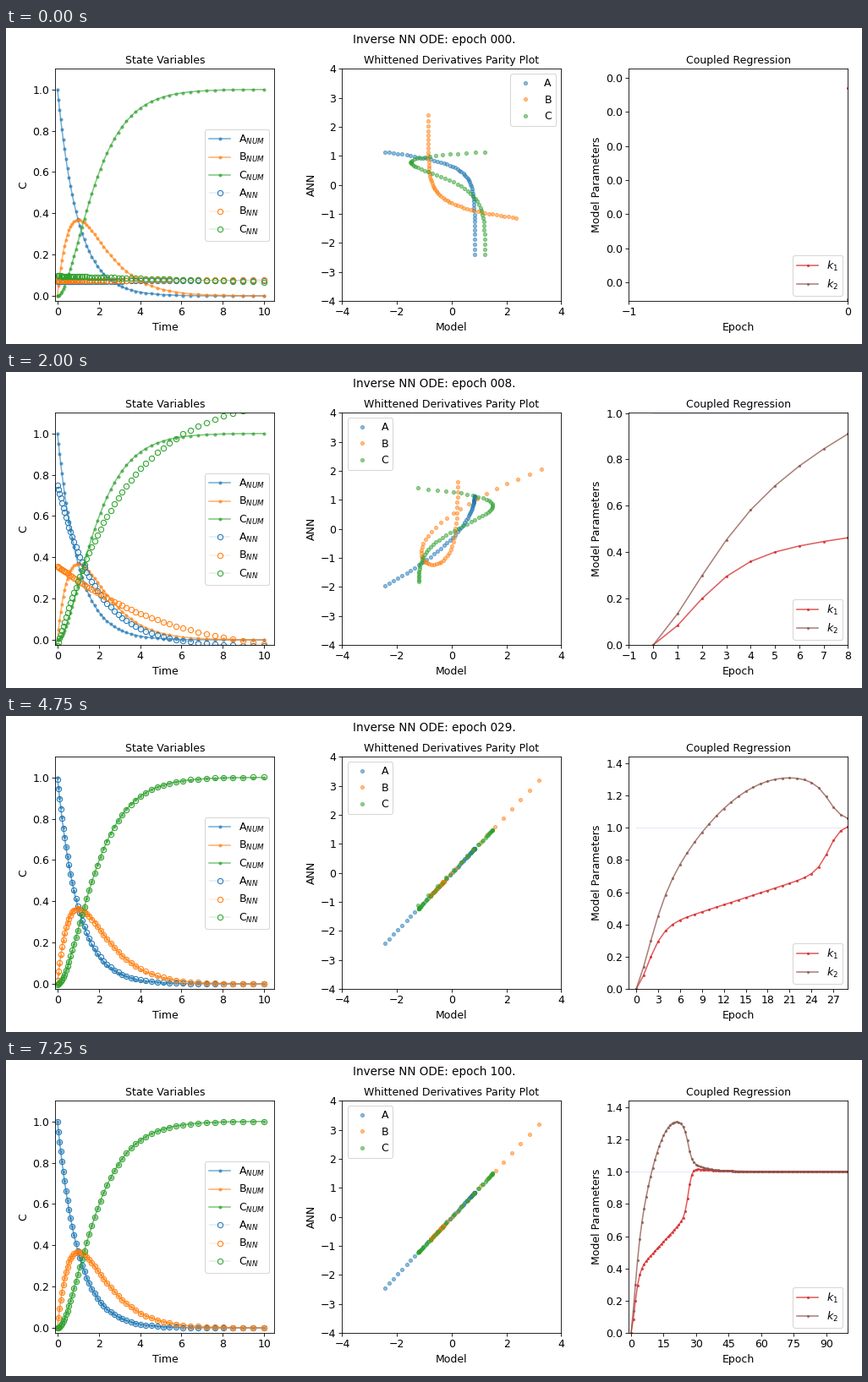
Recreate the animation shown at these times as a matplotlib script. Size 1012x374 px, loop 7500 ms.

```python
import numpy as np
import matplotlib.pyplot as plt
from matplotlib.animation import FuncAnimation
from matplotlib.ticker import FormatStrFormatter, MaxNLocator

W, H, DPI = 1012, 374, 75
FRAMES, INTERVAL = 30, 250
COLORS = ("C0", "C1", "C2")

plt.rcParams.update({"font.family": "DejaVu Sans", "font.size": 12,
                     "axes.titlesize": 12, "legend.fontsize": 12})


def fade(x, scale, power=1):
    """Stretched exponential from 1 down to 0."""
    return np.exp(-(x / scale) ** power)


def decay(start, end, scale, power=1):
    return end + (start - end) * fade(t, scale, power)


# Reaction A -> B -> C with unit rates, sampled evenly in log time
t = np.geomspace(1, 11, 50) - 1
A, B = np.exp(-t), t * np.exp(-t)
TRUE = np.array([A, B, 1 - A - B])
START = np.array([.07 + .0006 * t, .075 + .0003 * t, .097 - .003 * t])

# Rate constants: early growth, then both lock on to 1 near epoch 27
E = np.arange(101)
LOCK = 1 / (1 + np.exp(-1.18 * (E - 26.54)))
grow1 = 5.7e-4 + .345 * (1 - fade(E, 2.55, 1.6)) + .0147 * E
grow2 = 1.308 - .00235 * (21 - E) ** 2 - .2717 * fade(E, 2.9, 1.75)
K1 = grow1 + LOCK * (1 + .02 * fade(E - 28, 10) - grow1)
K2 = grow2 + LOCK * (1 + .06 * fade(E - 28, 6) - grow2)


def epoch_at(i):
    """Every epoch at first, then evenly in log scale up to 100."""
    return i if i <= 12 else round(100 * 10 ** (-2 / 37 * (29 - i)))


def network(e):
    """Network's A, B and C over time at epoch e."""
    n = min(max(e, 4), 20)
    s, k1, k2 = n / 20, K1[n], K2[n]
    d = .22 * np.exp(-n / 10)
    fit = np.array([
        decay(.69 + .0076 * n, -d / 3, 1 / (k1 + .09 * (1 - s ** 3))),
        decay(.36 - .055 * s ** 3, -d, 5.2 / k2, 1 + .9 * s ** 4),
        decay(.9 * np.exp(-n / 2) - .045, 1.02 + 17 * d * d, 3 / k2,
              .9 + .014 * n),
    ])
    fit = START + min(e / 4, 1) * (fit - START)
    return fit + LOCK[e] * (TRUE - fit)


def rates(k1, k2, a, b):
    """Whitened time derivatives of the three species."""
    return [(v - v.mean()) / v.std()
            for v in (-k1 * a, k1 * a - k2 * b, k2 * b)]


fig = plt.figure(figsize=(W / DPI, H / DPI), dpi=DPI)
title = fig.suptitle("", fontsize=13)


def panel(left, name, xlabel, ylabel):
    ax = fig.add_axes([left / W, 50.8 / H, 259 / W, 275 / H])
    ax.set(title=name, xlabel=xlabel, ylabel=ylabel)
    return ax


ax_state = panel(58.4, "State Variables", "Time", "C")
ax_par = panel(397.4, "Whittened Derivatives Parity Plot", "Model", "ANN")
ax_k = panel(736.4, "Coupled Regression", "Epoch", "Model Parameters")

for n, c, v in zip("ABC", COLORS, TRUE):
    ax_state.plot(t, v, ".-", color=c, alpha=.6, label=n + "$_{NUM}$")
nn = [ax_state.plot([], [], "o-", color=c, lw=.2, mfc="none",
                    label=n + "$_{NN}$")[0] for n, c in zip("ABC", COLORS)]
ax_state.set(xlim=(-.1, 10.5), ylim=(-.025, 1.1))
ax_state.legend(loc="center right")

par = [ax_par.plot([], [], "o", color=c, ms=4, alpha=.5, label=n)[0]
       for n, c in zip("ABC", COLORS)]
ax_par.set(xlim=(-4, 4), ylim=(-4, 4))
ax_par.legend(loc="best")

goal, = ax_k.plot([], [], color="blue", lw=1, alpha=.1)
ks = [ax_k.plot([], [], ".-", color=c, ms=4, alpha=.75, label=n)[0]
      for n, c in (("$k_1$", "C3"), ("$k_2$", "C5"))]
ax_k.xaxis.set_major_locator(MaxNLocator(integer=True))
ax_k.yaxis.set_major_formatter(FormatStrFormatter("%.1f"))
ax_k.legend(loc="lower right")


def update(i):
    e = epoch_at(i)
    title.set_text(f"Inverse NN ODE: epoch {e:03d}.")

    states = network(e)
    for line, v in zip(nn, states):
        line.set_data(t, v)

    model = rates(K1[e], K2[e], A, B)
    ann = rates(K1[e], K2[e], states[0], states[1])
    for line, x, y in zip(par, model, ann):
        line.set_data(x, y)

    past = slice(0, e + 1)
    for line, k in zip(ks, (K1, K2)):
        line.set_data(E[past], k[past])
    goal.set_data([0, e], [1, 1])
    ax_k.set_xlim(-1, e)
    ax_k.set_ylim(1.1 * K2[0], 1.1 * max(K1[past].max(), K2[past].max()))
    return [title, *nn, *par, *ks, goal]


# Negative bases never reach a fractional power: shifted fades use power 1
anim = FuncAnimation(fig, update, frames=FRAMES, interval=INTERVAL,
                     repeat=True, repeat_delay=0, blit=False)
plt.show()
```
